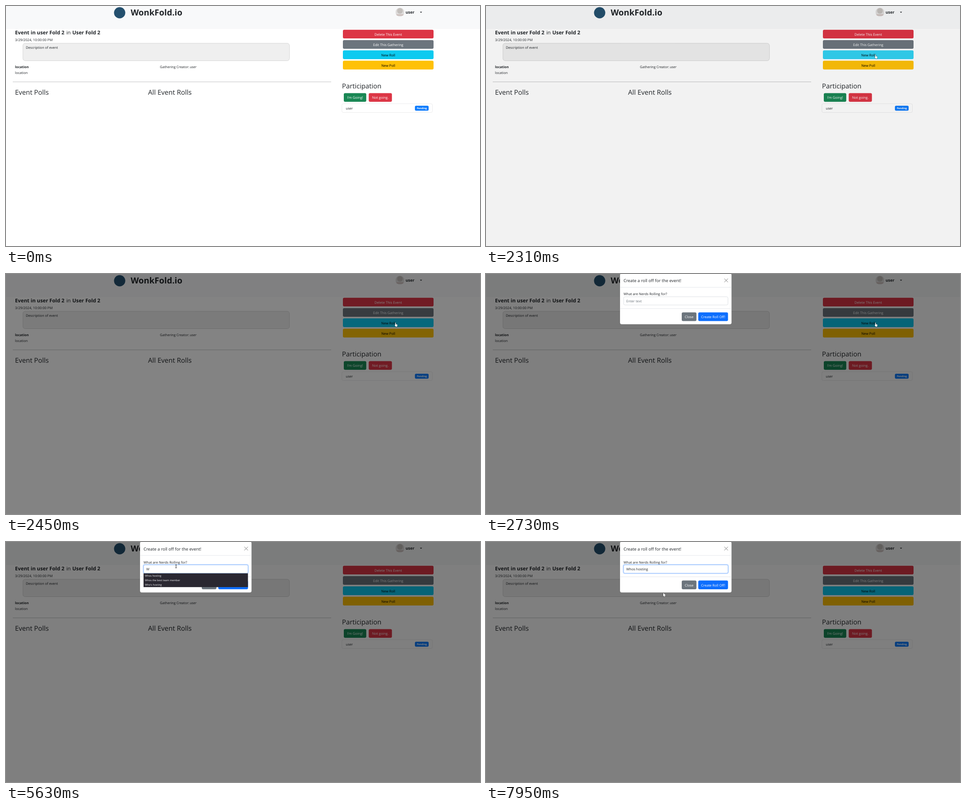
Write an HTML page with a canvas that moves like this. It is 1051x533 px and loops after 7990 ms.

```html
<!DOCTYPE html>
<html lang="en">
<head>
<meta charset="utf-8">
<title>Event page</title>
<style>
html, body { margin: 0; width: 100%; height: 100%; overflow: hidden; background: #fff; }
canvas { display: block; width: 100%; height: 100%; }
</style>
</head>
<body>
<canvas id="stage" width="1051" height="533"></canvas>
<script>
const W = 1051, H = 533, LOOP = 7990;
const ctx = document.getElementById('stage').getContext('2d');
const FONT = '"Open Sans", "Noto Sans", sans-serif';
const INK = '#212529', RED = '#dc3545', GRAY = '#6c757d', BLUE = '#0d6efd';

const clamp = v => Math.max(0, Math.min(1, v));
const span = (t, a, b) => clamp((t - a) / (b - a));
const during = (t, a, b) => t >= a && t < b;
const smooth = p => p * p * (3 - 2 * p);
const easeOut = p => 1 - Math.pow(1 - p, 1.7);

// Pointer legs: start, end, target x, target y
const START = [1027, 518];
const LEGS = [
  [990, 1700, 863, 108],
  [3190, 3640, 377, 54],
  [5630, 5720, 381, 54],
  [6070, 6410, 359, 73],
  [7040, 7160, 333, 67],
  [7750, 7950, 393, 113]
];
const CLICKS = [[2190, 2290], [3680, 3790], [6610, 6720]];
const CARET = [[3700, 4210], [4740, 5260], [5770, 6280], [6680, 6880], [7390, 7900]];
const anyOf = (list, t) => list.some(([a, b]) => during(t, a, b));

function text(str, x, y, size, { color = INK, weight = 400, style = 'normal', align = 'left' } = {}) {
  ctx.font = `${style} ${weight} ${size}px ${FONT}`;
  ctx.textAlign = align;
  ctx.fillStyle = color;
  ctx.fillText(str, x, y);
}

function rect(x, y, w, h, color) {
  ctx.fillStyle = color;
  ctx.fillRect(x, y, w, h);
}

function round(x, y, w, h, r, fill, stroke, line = 0.7) {
  ctx.beginPath();
  ctx.roundRect(x, y, w, h, r);
  if (fill) { ctx.fillStyle = fill; ctx.fill(); }
  if (stroke) { ctx.strokeStyle = stroke; ctx.lineWidth = line; ctx.stroke(); }
}

function disc(x, y, r, color) {
  ctx.beginPath();
  ctx.arc(x, y, r, 0, Math.PI * 2);
  ctx.fillStyle = color;
  ctx.fill();
}

function button(label, x, y, w, fill, color = '#fff') {
  round(x, y, w, 19.3, 3, fill);
  text(label, x + w / 2, y + 13, 7.6, { color, align: 'center' });
}

function polygon(points, fill, stroke, line = 0.8) {
  ctx.beginPath();
  points.forEach(([x, y]) => ctx.lineTo(x, y));
  ctx.closePath();
  if (stroke) {
    ctx.strokeStyle = stroke;
    ctx.lineWidth = line;
    ctx.lineJoin = 'round';
    ctx.stroke();
  }
  ctx.fillStyle = fill;
  ctx.fill();
}

function avatar(x, y) {
  ctx.save();
  ctx.beginPath();
  ctx.arc(x, y, 9.8, 0, Math.PI * 2);
  ctx.clip();
  rect(x - 10, y - 10, 20, 20, '#dedcdb');
  disc(x, y - 3, 6.3, '#c3bfbc');
  rect(x - 10, y + 5, 20, 2.5, '#c9b9b6');
  ctx.restore();
}

function header() {
  rect(0, 0, W, 51, '#f8f9fa');
  disc(252, 15, 12.5, '#24506e');
  text('WonkFold.io', 276.5, 20.6, 18.6, { weight: 700 });
  avatar(873.5, 13.8);
  text('user', 886, 16.8, 8.9, { weight: 700 });
  polygon([[917.8, 12.7], [922.6, 12.7], [920.2, 15.2]], INK);
}

function page(hover) {
  rect(0, 0, W, H, '#fff');
  header();

  text('Event in user Fold 2', 20, 63, 11.3, { weight: 700 });
  text('in', 133.7, 63, 11.3);
  text('User Fold 2', 147, 63, 11.3, { weight: 700 });
  text('3/29/2024, 10:00:00 PM', 20, 78.4, 7.6);
  round(37.5, 82.8, 591, 38.7, 5, '#efefef', '#c9c9c9');
  text('Description of event', 44, 94.5, 7.6);
  text('location', 20, 137.6, 7.5, { weight: 700 });
  text('location', 20, 151.4, 7.6);
  text('Gathering Creator:', 341.3, 137.6, 7.5);
  text('user', 408, 137.6, 7.5, { style: 'italic' });
  rect(15, 168, 706, 1, '#c2c3c4');
  text('Event Polls', 20, 197, 14.9);
  text('All Event Rolls', 315, 197, 15);

  button('Delete This Event', 747, 52.8, 201, RED);
  button('Edit This Gathering', 747, 75.8, 201, GRAY);
  button('New Roll', 747, 98.6, 201, hover ? '#31d2f2' : '#0dcaf0', '#000');
  button('New Poll', 747, 121.6, 201, '#ffc107', '#000');

  text('Participation', 745, 182.6, 14.8);
  button("I'm Going!", 749, 193.4, 49.8, '#198754');
  button('Not going.', 804.3, 193.4, 51.4, RED);
  round(744.8, 217, 200.6, 19.5, 3, '#fff', '#e2e3e4');
  text('user', 753.5, 230, 7.6);
  round(906.7, 221.6, 30.4, 10.8, 2.6, '#0d7bfd');
  text('Pending', 922, 229, 5.5, { color: '#fff', weight: 700, align: 'center' });
}

function field(t) {
  const focus = span(t, 3700, 3800);
  if (focus) round(303.3, 49, 235, 22, 4.5, `rgba(13,110,253,${0.25 * focus})`);
  round(305.2, 50.9, 231.3, 18.3, 3, '#fff', focus > 0.5 ? '#86b7fe' : '#ced4da');
  const value = t >= 6680 ? 'Whos hosting' : t >= 4740 ? 'W' : '';
  text(value || 'Enter text', 311, 63, 7.6, { color: value ? INK : GRAY });
  if (anyOf(CARET, t)) {
    const x = value ? 311 + ctx.measureText(value).width : 311;
    rect(Math.round(x), 55, 1, 10, '#222');
  }
}

function suggestions(active) {
  rect(305, 69.6, 231.5, 30.6, '#2a2831');
  if (active) rect(305, 69.6, 231.5, 10.2, '#00d9f7');
  ['Whos hosting', 'Whos the best team member', "Who's hosting"].forEach((s, i) =>
    text(s, 308, 77 + i * 10.1, 5.75, { color: '#f4f4f6' }));
}

function modal(t, y) {
  ctx.save();
  ctx.globalAlpha = span(t, 2455, 2605);
  ctx.translate(0, -25 * (1 - easeOut(span(t, 2455, 2755))));
  round(297, -1, 247.6, 113.2, 4, '#fff', 'rgba(0,0,0,.25)', 0.6);
  text('Create a roll off for the event!', 305, 18.8, 9.4);
  ctx.strokeStyle = '#777';
  ctx.lineWidth = 1;
  ctx.beginPath();
  for (const d of [-4, 4]) {
    ctx.moveTo(532.5 - d, 10.6);
    ctx.lineTo(532.5 + d, 18.6);
  }
  ctx.stroke();
  rect(297.4, 29.5, 247, 0.8, '#dee2e6');
  text('What are Nerds Rolling for?', 305, 47.7, 7.6);
  field(t);
  rect(297.4, 76.8, 247, 0.8, '#dee2e6');
  button('Close', 434, 85.6, 32.6, GRAY);
  button('Create Roll Off!', 470.6, 85.6, 66, BLUE);
  if (during(t, 4790, 6680)) suggestions(y > 69.6);
  ctx.restore();
}

function pointerAt(t) {
  let [x, y] = START;
  for (const [a, b, tx, ty] of LEGS) {
    const p = smooth(span(t, a, b));
    x += (tx - x) * p;
    y += (ty - y) * p;
  }
  return [x, y];
}

function arrow() {
  polygon([[0, 0], [0, 8.2], [1.9, 6.5], [3.2, 9.3], [4.4, 8.7], [3.2, 6], [5.8, 5.8]], '#fff', '#222');
}

function hand() {
  polygon([[0, 0], [1.2, 0], [1.4, 3.4], [4.4, 4.2], [4.8, 5], [4.3, 8.8], [1, 8.8], [-1.3, 5.6], [-0.8, 5], [0, 5.6]],
    '#fff', '#222');
}

function beam() {
  rect(-0.4, -4, 0.9, 8, '#111');
  rect(-1.6, -4, 3.2, 0.7, '#111');
  rect(-1.6, 3.3, 3.2, 0.7, '#111');
}

function pointer(t, x, y, onButton) {
  if (t < 990 || during(t, 4740, 5630)) return;
  if (anyOf(CLICKS, t)) disc(x, y, 6, 'rgba(250,232,20,.72)');
  const onField = t > 2760 && x > 305 && x < 537 && y > 50 && y < 69.6;
  ctx.save();
  ctx.translate(x, y);
  if (onButton && t <= 3190) hand();
  else if (onField) beam();
  else arrow();
  ctx.restore();
}

function draw(t) {
  const [x, y] = pointerAt(t);
  const onButton = x > 747 && x < 948 && y > 98 && y < 118;
  page(onButton && t >= 990 && t < 2400);
  const shade = 0.5 * span(t, 2294, 2456);
  if (shade) rect(0, 0, W, H, `rgba(0,0,0,${shade})`);
  if (t >= 2455) modal(t, y);
  pointer(t, x, y, onButton);
}

ctx.textRendering = 'geometricPrecision';
const began = performance.now();
function tick() {
  draw((performance.now() - began) % LOOP);
  requestAnimationFrame(tick);
}
tick();
</script>
</body>
</html>
```
